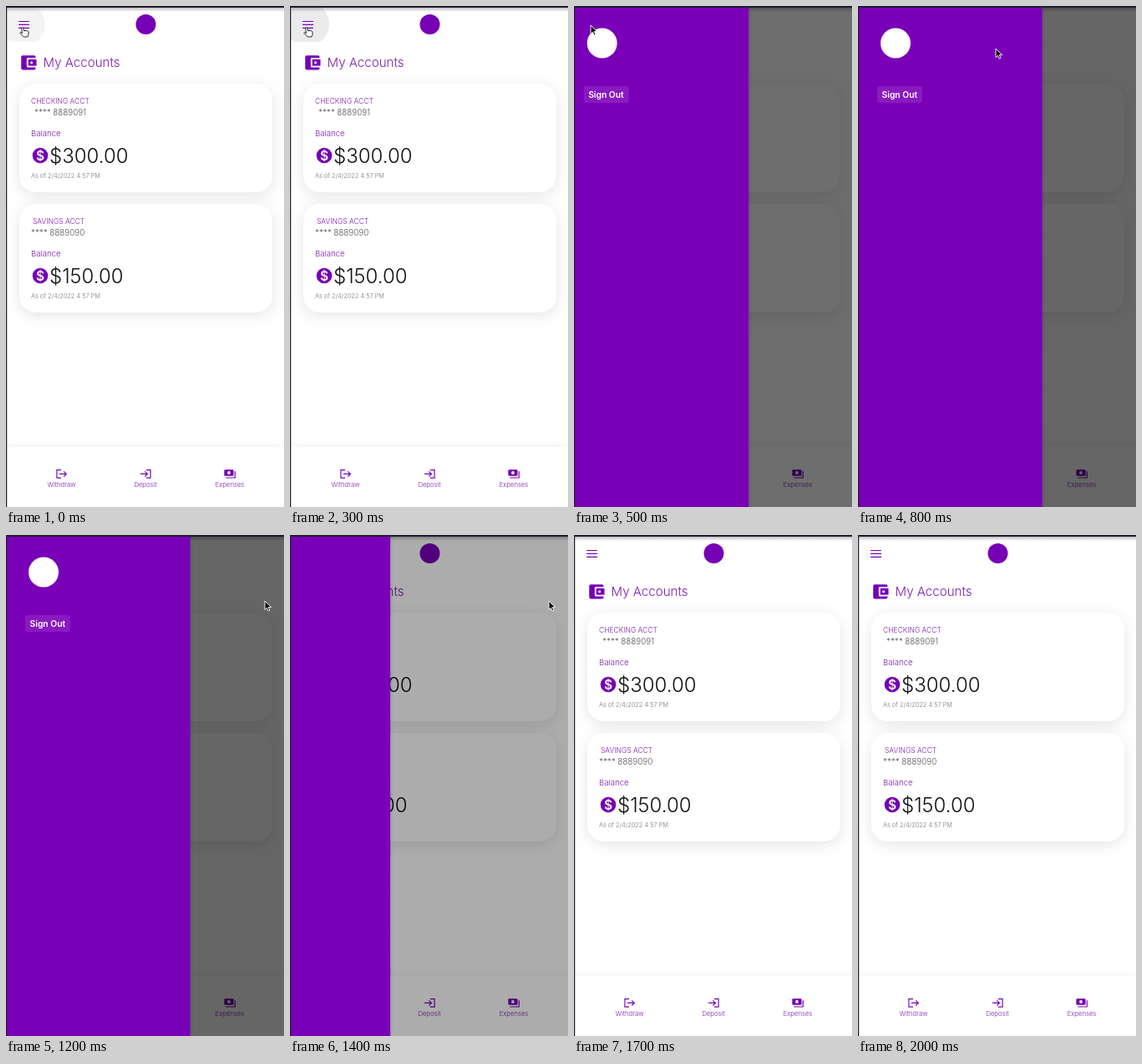
Recreate the animation shown at these times as an HTML page. Size 333 px wide and 600 px high, loop 2100 ms.

```html
<!DOCTYPE html>
<html lang="en">
<head>
<meta charset="utf-8">
<title>Accounts drawer</title>
<style>
  html, body { margin: 0; width: 100%; height: 100%; overflow: hidden; background: #fff; }
  svg { display: block; width: 333px; height: 600px; font-family: Inter, "Open Sans", sans-serif; }
  .brand { fill: #7600b5; }
  .line { fill: none; stroke: #7600b5; stroke-width: 1.15; }
  .card { fill: #fff; filter: drop-shadow(0 4px 9px rgba(0, 0, 0, .1)); }
  .bar { fill: #fff; filter: drop-shadow(0 -1px 3px rgba(0, 0, 0, .06)); }
  .label { fill: #7d1fae; font-weight: 300; }
  .grey { fill: #555; font-weight: 300; }
  .nav { font-size: 7.7px; text-anchor: middle; }
</style>
</head>
<body>
<svg viewBox="0 0 333 600">
  <defs>
    <linearGradient id="edge">
      <stop stop-opacity=".1"/><stop offset="1" stop-opacity="0"/>
    </linearGradient>
    <linearGradient id="top" x2="0" y2="1">
      <stop stop-opacity=".25"/><stop offset="1" stop-opacity="0"/>
    </linearGradient>
    <clipPath id="header"><rect width="333" height="43"/></clipPath>
  </defs>
  <rect width="333" height="600" fill="#fff"/>

  <!-- header -->
  <circle id="hover" cx="21" cy="22" r="26" clip-path="url(#header)"/>
  <path class="line" d="M15 18.5h13M15 22.4h13M15 26.3h13"/>
  <circle class="brand" cx="167.5" cy="22" r="12"/>
  <g class="brand">
    <rect x="18.2" y="59.2" width="17.3" height="17.2" rx="1.8"/>
    <rect x="24.8" y="62" width="13" height="11.5" rx="1.5" fill="#fff"/>
    <rect x="26.7" y="63.9" width="9.8" height="7.7"/>
    <circle cx="30.6" cy="67.7" r="1.5" fill="#fff"/>
  </g>
  <text class="label" x="44.5" y="73" font-size="15.1">My Accounts</text>
  <rect y="2" width="333" height="5" fill="url(#top)"/>

  <g id="cards"></g>

  <!-- bottom bar -->
  <rect class="bar" y="527.5" width="333" height="80"/>
  <path class="line" d="M66 555.6h-5.1v9.6h5.1M63.8 560.4h8.4M69.2 557.3l3.1 3.1-3.1 3.1"/>
  <path class="line" d="M168 555.6h5.1v9.6h-5.1M161 560.4h8.4M166.4 557.3l3.1 3.1-3.1 3.1"/>
  <rect class="brand" x="261.4" y="555.2" width="11.2" height="7.6" rx="1.2"/>
  <circle cx="267" cy="559" r="1.9" fill="#fff"/>
  <path class="line" d="M274.3 557.2v7.8h-11"/>
  <g class="label nav">
    <text x="66.5" y="575.5">Withdraw</text>
    <text x="167" y="575.5">Deposit</text>
    <text x="268" y="575.5">Expenses</text>
  </g>

  <rect id="shade" width="333" height="600"/>

  <!-- drawer, drawn fully open -->
  <g id="drawer">
    <rect x="220.5" width="4" height="600" fill="url(#edge)"/>
    <rect width="220.6" height="600" fill="#7a00b8"/>
    <circle cx="45" cy="44.5" r="18" fill="#fff"/>
    <rect x="23" y="96" width="54" height="20" rx="3" fill="#fff" opacity=".1"/>
    <text x="28.5" y="109.8" font-size="10.3" font-weight="600" fill="#fff">Sign Out</text>
  </g>

  <!-- window frame -->
  <path d="M0 0H333V2H1.2V600H0z" fill="#1b1e2e"/>

  <g id="pointer" stroke-width=".9" stroke-linejoin="round">
    <path id="arrow" fill="#111" stroke="#fff" d="M0 0v10.5l2.5-2.2 1.7 3.7 1.8-.8-1.7-3.6h3.4z"/>
    <path id="hand" fill="#fff" stroke="#111"
      d="M0 1q1-1.2 2 0l1.2 4 1.3-.7 1.3.5 1.3-.1 1.4 1.4v3l-1.3 2.9H2.8L-1.8 7.4q.3-1.4 1.7-.5l1.1.8z"/>
  </g>
</svg>
<script>
const $ = id => document.getElementById(id);
const WIDTH = 220, LOOP = 2100, STEP = 100;

const card = (y, name, nameX, number, numberX, amount) => `
  <g transform="translate(0 ${y})">
    <rect class="card" x="16" width="303" height="130" rx="20"/>
    <text class="label" x="${nameX}" y="24" font-size="8.5">${name}</text>
    <text class="grey" x="${numberX}" y="38.3" font-size="9.8">**** ${number}</text>
    <text class="label" x="30" y="63" font-size="9.6">Balance</text>
    <circle class="brand" cx="41" cy="86" r="9.3"/>
    <text x="41" y="91.7" font-size="15.5" font-weight="600" fill="#fff" text-anchor="middle">$</text>
    <text x="52" y="94.7" font-size="24" font-weight="350" fill="#111">${amount}</text>
    <text x="30" y="112.5" font-size="7.4" font-weight="300" fill="#777">As of 2/4/2022 4:57 PM</text>
  </g>`;
$("cards").innerHTML =
  card(93, "CHECKING ACCT", 30, "8889091", 34, "$300.00") +
  card(237, "SAVINGS ACCT", 32, "8889090", 30, "$150.00");

const clamp = v => Math.min(1, Math.max(0, v));
const progress = (t, start, length) => clamp((t - start) / length);
const mix = (a, b, k) => a + (b - a) * k;
const smooth = k => k * k * (3 - 2 * k);

// cubic-bezier(.25, .8, .25, 1)
function ease(x) {
  const curve = (a, b, s) => 3 * a * s * (1 - s) ** 2 + 3 * b * s * s * (1 - s) + s ** 3;
  let low = 0, high = 1;
  for (let i = 0; i < 24; i++) {
    const mid = (low + high) / 2;
    if (curve(.25, .25, mid) < x) low = mid; else high = mid;
  }
  return curve(.8, 1, high);
}

function pointerAt(t) {
  if (t < 400) return [18.5, 25];
  if (t <= 1500) {
    const k = smooth(progress(t, 600, 400));
    return [mix(20, 310, k), mix(23, 79, k)];
  }
  const k = progress(t, 1500, 200);
  return [mix(310, 345, k), mix(79, 50, k)];
}

function draw(t) {
  const open = ease(progress(t, 324, 328)) - ease(progress(t, 1357, 300));
  const [x, y] = pointerAt(t);
  $("drawer").setAttribute("transform", `translate(${(open - 1) * WIDTH} 0)`);
  $("drawer").style.display = open > .001 ? "" : "none";
  $("shade").style.opacity = .6 * open;
  $("hover").style.opacity = t < 1200 ? mix(.045, .08, progress(t, 0, 200)) : 0;
  $("pointer").setAttribute("transform", `translate(${x} ${y})`);
  $("pointer").style.display = t < 1700 ? "" : "none";
  $("hand").style.display = t < 400 ? "" : "none";
  $("arrow").style.display = t < 400 ? "none" : "";
}

const begin = performance.now();
function tick() {
  const t = (performance.now() - begin) % LOOP;
  draw(Math.floor(t / STEP) * STEP);
  requestAnimationFrame(tick);
}
tick();
</script>
</body>
</html>
```
